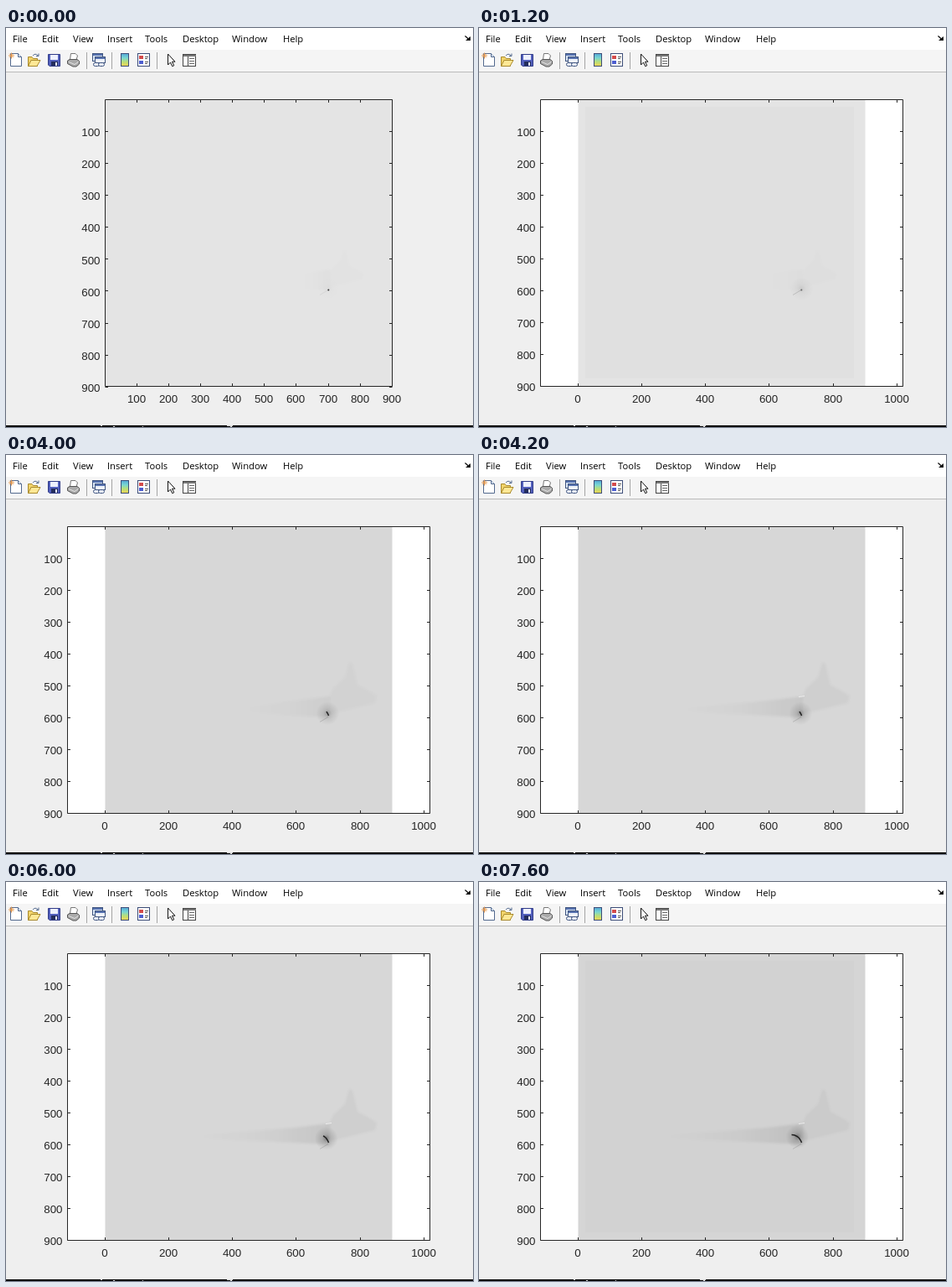
Animation, 558 px wide and 476 px high, one loop 8 s. Source, as an HTML page:

```html
<!DOCTYPE html>
<html lang="en">
<head>
<meta charset="utf-8">
<title>Figure window</title>
<style>
html, body { margin: 0; width: 558px; height: 476px; overflow: hidden; background: #efefef; }
svg { display: block; }
.menu { font: 11.2px "Open Sans", "Noto Sans", sans-serif; fill: #000; }
.ticks text { font: 13.33px "Liberation Sans", Arial, sans-serif; fill: #262626; }
.ticks path { fill: none; stroke: #262626; stroke-width: 1; }
</style>
</head>
<body>
<svg width="558" height="476" viewBox="0 0 558 476">
  <defs>
    <linearGradient id="rainbow" x2="0" y2="1">
      <stop stop-color="#55a8d8"/><stop offset=".35" stop-color="#79d6d2"/>
      <stop offset=".65" stop-color="#b7df7a"/><stop offset="1" stop-color="#f0d452"/>
    </linearGradient>
    <linearGradient id="fade">
      <stop stop-opacity="0"/><stop offset=".5" stop-opacity=".35"/><stop offset="1" stop-opacity="1"/>
    </linearGradient>
    <radialGradient id="halo">
      <stop stop-opacity=".5"/><stop offset=".35" stop-opacity=".2"/><stop offset="1" stop-opacity="0"/>
    </radialGradient>
    <filter id="soft" x="-20%" y="-20%" width="140%" height="140%"><feGaussianBlur stdDeviation="1.4"/></filter>
  </defs>

  <rect width="558" height="476" fill="#efefef"/>
  <rect width="558" height="26" fill="#fff"/>
  <rect y="26" width="558" height="27" fill="#f5f5f5"/>
  <path d="M0 52.5H558" stroke="#bababa"/>
  <g id="menu" class="menu"></g>
  <path d="M548.5 9.5L553 13.5" stroke="#111" stroke-width="1.4"/><path d="M555 10V15H549Z" fill="#111"/>
  <path d="M96.5 29V49M126.5 29V49M180.5 29V49" stroke="#a5a5a5"/>

  <g id="icons">
    <path d="M5.5 30.5H14.5L18.500 34.500V45.500H5.500Z" fill="#fff" stroke="#52698e"/>
    <path d="M14.500 30.500V34.500H18.500" fill="#dce6f4" stroke="#52698e"/>
    <path d="M3 33H10M6.500 29.500V36.500M4.200 30.700L8.800 35.300M8.800 30.700L4.200 35.300" stroke="#e69a50"/>

    <path d="M26.500 45.500V34.500H31L32.500 36.500H37.500V45.500Z" fill="#f2d36a" stroke="#a98a2d"/>
    <path d="M26.500 45.500L30 38.500H41L37 45.500Z" fill="#ffe895" stroke="#a98a2d"/>
    <path d="M32 33Q35 29.500 38.500 33M39 30.500V33.500H36" fill="none" stroke="#52698e"/>

    <path d="M50.500 31.500H64.500V45.500H52L50.500 44Z" fill="#5360bd" stroke="#313c88"/>
    <rect x="53" y="32" width="9" height="6" fill="#eef1ff"/>
    <rect x="54" y="40" width="8" height="5" fill="#232c5c"/>
    <rect x="59" y="41" width="2" height="4" fill="#e5e8f8"/>

    <path d="M76.500 38L77.500 30.500H83L85.500 33L84 38Z" fill="#fff" stroke="#777"/>
    <path d="M73.500 39L76 37.500H85L87.500 39.500V43L84 46H80L73.500 42.500Z" fill="#aaa" stroke="#555"/>
    <path d="M75 40.500L82 43.500L87 40" fill="none" stroke="#e2e2e2"/>

    <rect x="103.500" y="30.500" width="12" height="9" fill="#dce8f7" stroke="#40557f"/>
    <path d="M104 32H115" stroke="#5873b0" stroke-width="2"/>
    <rect x="106.500" y="34.500" width="12" height="7" fill="#eff4fb" stroke="#40557f"/>
    <path d="M107 36H118" stroke="#5873b0" stroke-width="2"/>
    <rect x="104.500" y="41.500" width="7" height="4" rx="2" fill="#e9eef8" stroke="#40557f"/>
    <rect x="110.500" y="41.500" width="7" height="4" rx="2" fill="#e9eef8" stroke="#40557f"/>

    <rect x="137.500" y="30.500" width="9" height="15" fill="url(#rainbow)" stroke="#3c4d78"/>

    <rect x="157.500" y="30.500" width="14" height="15" fill="#fff" stroke="#3c4d78"/>
    <rect x="159" y="33" width="5" height="4" fill="#d34b4b"/>
    <rect x="159" y="39" width="5" height="4" fill="#4d5ed0"/>
    <path d="M166 34.500H170M166 36.500H169M166 40.500H170M166 42.500H169" stroke="#555"/>

    <path d="M193.500 31V44L196.500 41L198.700 45.700L200.700 44.800L198.500 40.200H202Z" fill="#fff" stroke="#111"/>

    <rect x="211.500" y="31.500" width="15" height="14" fill="#fff" stroke="#444"/>
    <path d="M212 33H227" stroke="#777" stroke-width="2"/>
    <path d="M217.500 34V45" stroke="#444"/>
    <path d="M219 36.500H225M219 39.500H225M219 42.500H225" stroke="#666"/>
  </g>

  <rect id="paper" x="73" y="85" width="434" height="343" fill="#fff"/>
  <rect id="rim" x="118.500" y="85.500" width="343" height="342"/>
  <rect id="field" x="127" y="94" width="321" height="324"/>

  <g filter="url(#soft)">
    <path id="wedge" fill="url(#fade)"/>
    <path id="lobe" d="M0 -20L5 -31L19 -44L24 -62L28 -60L34 -35L47 -28L57 -22L55 -13L30 -7L2 0Z"/>
  </g>
  <path id="streak" d="M375 318.500L385 312.500" stroke="#777"/>
  <circle id="glow" r="14" fill="url(#halo)"/>
  <path id="glint" d="M382 288.500L389 287.500" stroke="#f1f1f1"/>
  <circle id="seed" cx="385.300" cy="312.600" r="1" fill="#333"/>
  <path id="crack" d="M385.500 311L384.500 308.500L382.500 305.500L380 303.500L377 302L373.500 301.500" fill="none" stroke="#202020" stroke-width="1.500"/>

  <g id="narrow" class="ticks"></g>
  <g id="wide" class="ticks"></g>

  <rect y="474" width="558" height="2" fill="#080808"/>
  <path d="M113 474.500H115M128 475.500H130M163 475.500H164M264 474.500H271M268 475.500H270" stroke="#ddd"/>
</svg>
<script>
const $ = id => document.getElementById(id);
const LOOP = 8000, TOP = 85.5, BOTTOM = 427.5, ORIGIN = 118.5;
const SCALE = 343 / 900; // pixels per unit

const menu = [['File', 8], ['Edit', 43], ['View', 80], ['Insert', 121], ['Tools', 166],
  ['Desktop', 211], ['Window', 270], ['Help', 331]];
$('menu').innerHTML = menu.map(([s, x]) => `<text x="${x}" y="17">${s}</text>`).join('');

function drawAxes(id, left, right, first, last, step, scaleY) {
  let d = `M${left} ${TOP}H${right}V${BOTTOM}H${left}Z`, labels = '';
  const snap = v => Math.floor(v) + 0.5;
  for (let v = first; v <= last; v += step) {
    const x = snap(ORIGIN + (v - 0.5) * SCALE);
    d += `M${x} ${BOTTOM}v-3.5M${x} ${TOP}v3.5`;
    labels += `<text x="${x - 0.5}" y="447" text-anchor="middle">${v}</text>`;
  }
  for (let v = 100; v <= 900; v += 100) {
    const y = TOP + (v - 0.5) * scaleY;
    d += `M${left} ${snap(y)}h3.5M${right} ${snap(y)}h-3.5`;
    labels += `<text x="${left - 6}" y="${Math.round(y + 5.7)}" text-anchor="end">${v}</text>`;
  }
  $(id).innerHTML = `<path d="${d}"/>${labels}`;
}
drawAxes('narrow', 118.5, 461.5, 100, 900, 100, SCALE);
drawAxes('wide', 73.5, 506.5, 0, 1000, 200, 342 / 900);

// time, rim grey, field grey, wedge left edge, wedge, lobe, lobe size, glow
const shades = [
  [0, 228, 228, 352, .02, .009, .72, .04],
  [1200, 228, 224, 340, .012, .008, .72, .18],
  [1400, 220, 219, 325, .02, .012, .8, .25],
  [2400, 216, 215, 305, .035, .018, .9, .4],
  [3400, 215, 215, 285, .045, .022, 1, .5],
  [4200, 215, 215, 245, .075, .035, 1, .55],
  [5400, 215, 215, 232, .085, .038, 1, .7],
  [7200, 213, 210, 225, .09, .035, 1, .7]
];
// time, visible crack length
const growth = [[0, 0], [1600, .6], [1800, 1.5], [2200, 2.2], [3000, 3.2], [3400, 4.2],
  [4000, 5.6], [4600, 7], [4800, 7.7], [5400, 9.2], [5600, 9.7], [6000, 10.6],
  [6400, 12], [6800, 13], [7200, 14.6], [7600, 16.4]];

const at = (table, t) => table.reduce((found, row) => row[0] <= t ? row : found);
const set = (id, attrs) => { for (const k in attrs) $(id).setAttribute(k, attrs[k]); };
const grey = v => `rgb(${v},${v},${v})`;

function draw(t) {
  const isWide = t >= 1200;
  const [, rim, field, left, wedge, lobe, size, glow] = at(shades, t);
  const length = at(growth, t)[1];
  const mid = $('crack').getPointAtLength(length * .55);
  const bend = Math.max(left + 5, 345);
  set('paper', { opacity: +isWide });
  set('wide', { opacity: +isWide });
  set('narrow', { opacity: +!isWide });
  set('rim', { fill: grey(rim) });
  set('field', { fill: grey(field) });
  set('wedge', {
    d: `M${left} 302L${bend} 293L387 288V313L${bend} 311L${left} 306Z`,
    opacity: wedge
  });
  set('lobe', { opacity: lobe, transform: `translate(386 309) scale(${size})` });
  set('glow', { cx: mid.x, cy: mid.y, opacity: glow });
  set('streak', { opacity: isWide ? .3 : .12 });
  set('glint', { opacity: t >= 4200 ? .9 : 0 });
  set('seed', { opacity: t < 1800 ? (isWide ? .65 : 1) : 0 });
  set('crack', { 'stroke-dasharray': `${length} 40`, opacity: t < 1600 ? 0 : 1 });
}

const start = performance.now();
function tick() {
  draw((performance.now() - start) % LOOP);
  requestAnimationFrame(tick);
}
tick();
</script>
</body>
</html>
```
